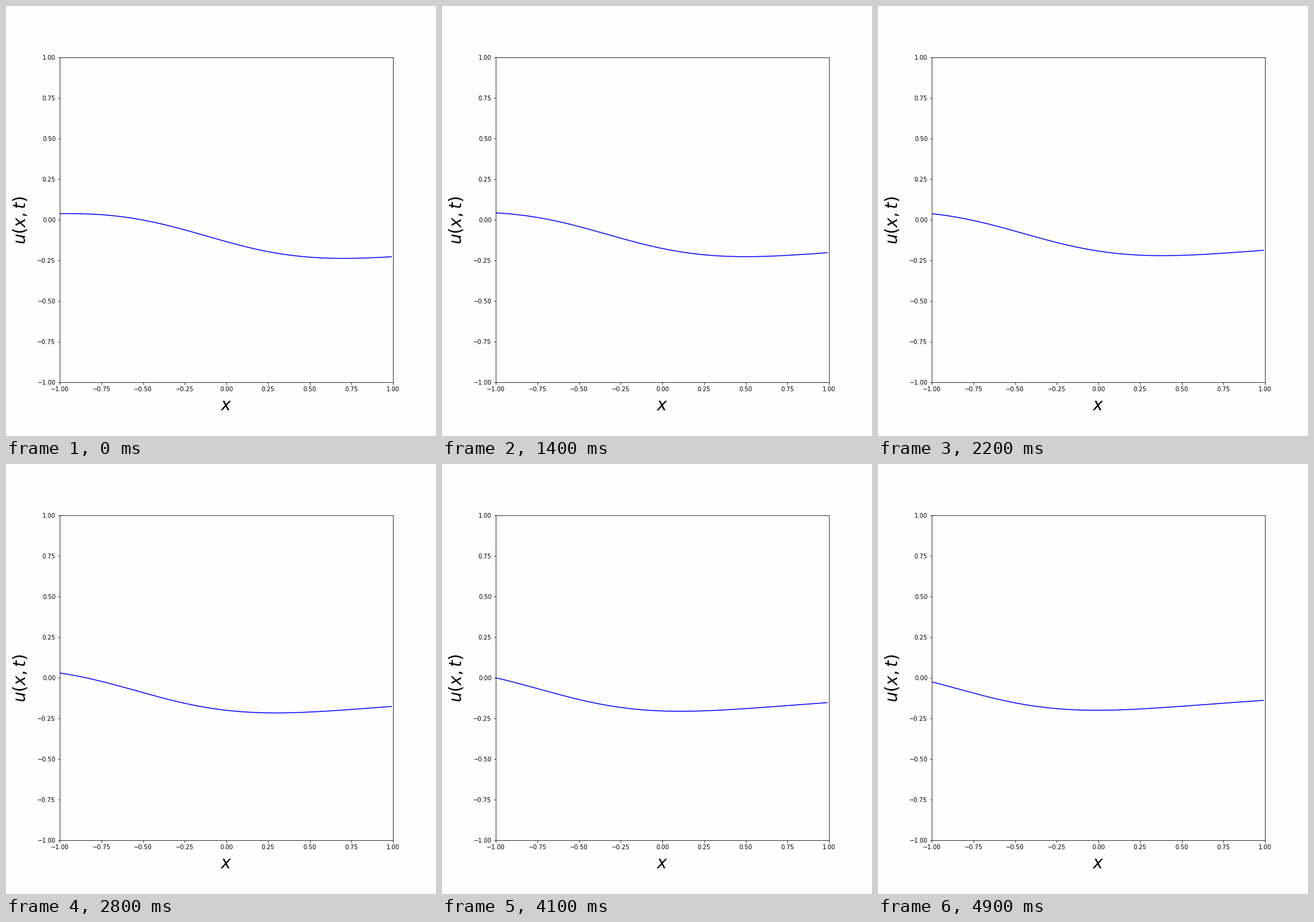
Recreate the animation shown at these times as a matplotlib script. Size 720 by 720 pixels, loop 5 s.

```python
import numpy as np
import matplotlib.pyplot as plt
from matplotlib.animation import FuncAnimation

SIZE, DPI = 720, 72
FRAMES, INTERVAL = 50, 100
BACKGROUND = "#fefefe"

x = np.arange(-1, 1, 0.01)


def wave(t):
    """A sech-tanh pulse that drifts left while it widens and its level rises."""
    level = -0.099 + 0.0071 * t
    amplitude = 0.138 - 0.0006 * t
    center = -0.12 - 0.15 * t
    steepness = 1.07 - 0.006 * t
    s = steepness * (x - center)
    return level - 2 * amplitude * np.tanh(s) / np.cosh(s)


plt.rcParams.update({"font.family": "DejaVu Sans", "font.size": 10,
                     "mathtext.fontset": "dejavusans"})
fig = plt.figure(figsize=(SIZE / DPI, SIZE / DPI), dpi=DPI, facecolor=BACKGROUND)
ax = fig.add_axes([0.125, 0.125, 0.775, 0.755], facecolor=BACKGROUND)
ticks = np.linspace(-1, 1, 9)
ax.set(xlim=(-1, 1), ylim=(-1, 1), xticks=ticks, yticks=ticks)


def axis_label(px, py, text, rotation=0):
    fig.text(px / SIZE, 1 - py / SIZE, text, fontsize=28, rotation=rotation,
             rotation_mode="anchor", ha="center", va="baseline")


axis_label(369, 677, "$x$")
axis_label(32, 358.2, "$u(x,t)$", rotation=90)
line, = ax.plot(x, wave(0), color="blue", lw=1.5)


def update(frame):
    line.set_ydata(wave(frame * INTERVAL / 1000))
    return line,


anim = FuncAnimation(fig, update, frames=FRAMES, interval=INTERVAL,
                     repeat=True, repeat_delay=0)
plt.show()
```
